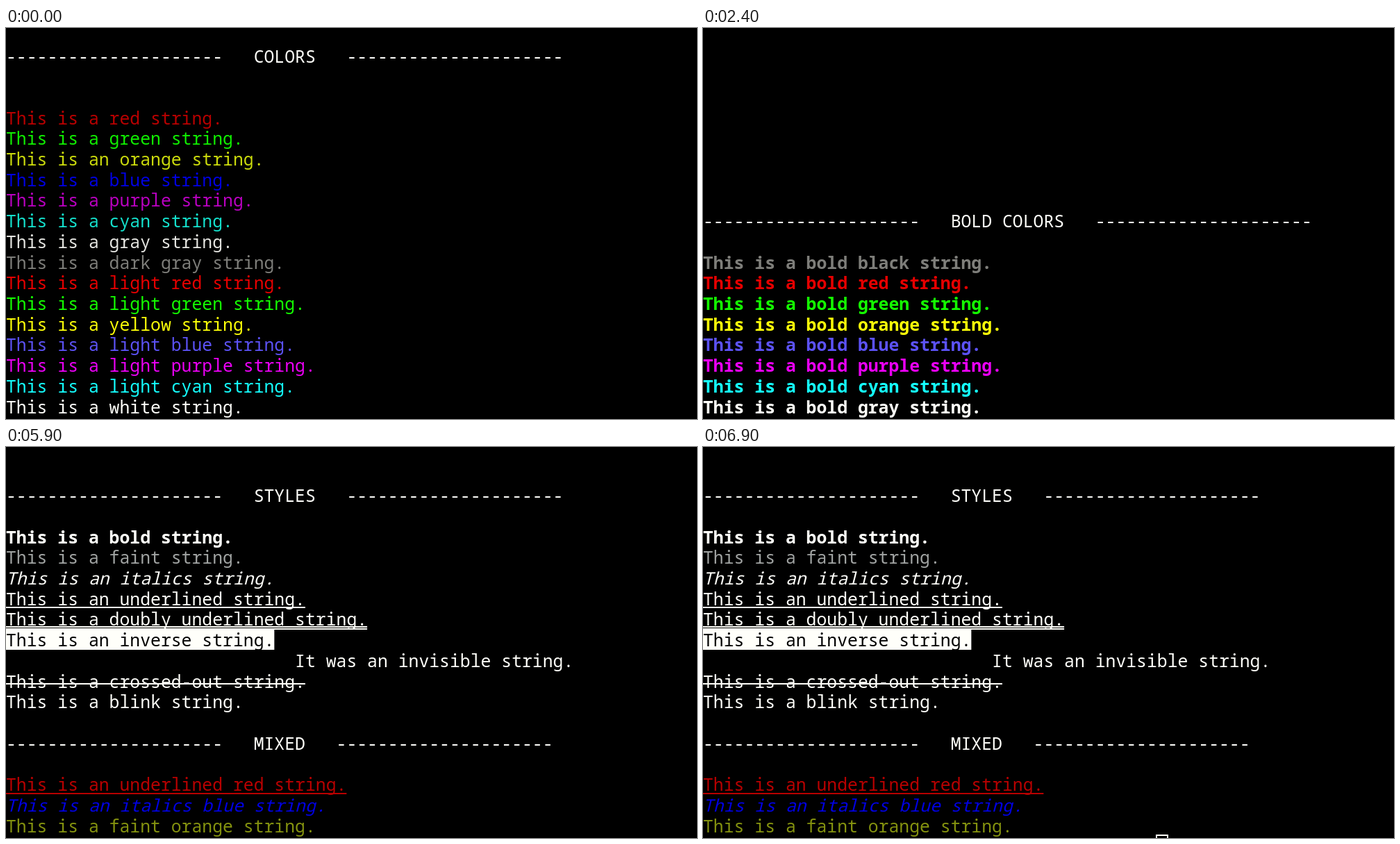
An HTML page with a canvas that plays this animation: 995 by 563 pixels, repeating every 7 s.

```html
<!DOCTYPE html>
<html lang="en">
<head>
<meta charset="utf-8">
<title>Terminal colors</title>
<style>
  html, body { margin: 0; width: 100%; height: 100%; overflow: hidden; background: #000; }
  canvas { display: block; }
</style>
</head>
<body>
<canvas id="term" width="995" height="563"></canvas>
<script>
const ctx = document.getElementById('term').getContext('2d');
const CELL = 14.86, ROW = 29.71, TOP = -4.8, LOOP = 7000;
const WHITE = '#fffffa';

const names = ['black', 'red', 'green', 'orange', 'blue', 'purple', 'cyan', 'gray',
  'dark gray', 'light red', 'light green', 'yellow', 'light blue', 'light purple', 'light cyan', 'white'];
const colors = ['#000000', '#b80000', '#10ee00', '#cada0c', '#0000e0', '#b900c0', '#14e0cc', '#e4e4e0',
  '#7e7e7a', '#e60000', '#14ff00', '#fcff08', '#5c52f6', '#ea00f4', '#14ffff', WHITE];

const rowTop = row => TOP + row * ROW;

function bar(row, from, to, width, color) {
  ctx.fillStyle = color;
  ctx.fillRect(0, Math.round(rowTop(row) + from), width, to - from);
}

// Each character sits on the terminal's cell grid.
function print(row, text, { color = WHITE, style = '', col = 0, back } = {}) {
  if (back) {
    const y = Math.round(rowTop(row));
    ctx.fillStyle = back;
    ctx.fillRect(0, y, text.length * CELL, Math.round(rowTop(row + 1)) - y);
  }
  ctx.font = `${style} 24.77px "Noto Sans Mono", "DejaVu Sans Mono", monospace`;
  ctx.fillStyle = color;
  [...text].forEach((ch, i) => ctx.fillText(ch, (col + i) * CELL, Math.round(rowTop(row) + 24.6)));
}

function line(row, text, offset, thickness, color = WHITE) {
  bar(row, offset, offset + thickness, text.length * CELL, color);
}

function title(row, text) {
  const dashes = '-'.repeat(21);
  print(row, `${dashes}   ${text}   ${dashes}`);
}

function plainColors() {
  title(1, 'COLORS');
  names.forEach((name, i) => {
    const article = name === 'orange' ? 'an' : 'a';
    print(3 + i, `This is ${article} ${name} string.`, { color: colors[i] });
  });
}

function boldColors() {
  title(9, 'BOLD COLORS');
  names.slice(0, 8).forEach((name, i) =>
    print(11 + i, `This is a bold ${name} string.`, { color: colors[i + 8], style: 'bold' }));
}

function backgrounds() {
  const swap = { blue: 'cyan', cyan: 'blue' };
  title(1, 'BACKGROUND COLORS');
  names.forEach((name, i) => {
    const back = colors[names.indexOf(swap[name] || name)];
    print(3 + i, `This is a background ${name} string.`, { back });
  });
  print(18, '<-(white)', { col: 35 });
}

function styles(t) {
  const under = 'This is an underlined string.';
  const double = 'This is a doubly underlined string.';
  const crossed = 'This is a crossed-out string.';
  const underRed = 'This is an underlined red string.';

  title(2, 'STYLES');
  print(4, 'This is a bold string.', { style: 'bold' });
  print(5, 'This is a faint string.', { color: '#a0a3a2' });
  print(6, 'This is an italics string.', { style: 'italic' });
  print(7, under);
  line(7, under, 27, 2);
  print(8, double);
  line(8, double, 25, 2);
  print(9, 'This is an inverse string.', { color: '#000', back: WHITE });
  line(8, double, 28, 2);
  print(10, 'It was an invisible string.', { col: 28 });
  print(11, crossed);
  line(11, crossed, 18, 2);
  const blinkOn = t >= 5600 && Math.floor((t - 5600) / 600) % 2 === 0;
  if (blinkOn) print(12, 'This is a blink string.');

  title(14, 'MIXED');
  print(16, underRed, { color: colors[1] });
  line(16, underRed, 27, 2, colors[1]);
  print(17, 'This is an italics blue string.', { color: colors[4], style: 'italic' });
  print(18, 'This is a faint orange string.', { color: '#84920f' });
  cursor(t);
}

function cursor(t) {
  if (t >= 6900) {
    ctx.strokeStyle = WHITE;
    ctx.lineWidth = 2;
    ctx.strokeRect(653, 559, 16, 30);
  } else if (t < 5900 || t >= 6500) {
    ctx.fillStyle = WHITE;
    ctx.fillRect(653.5, 560, 14.5, 30);
  }
}

function draw(now) {
  const t = now % LOOP;
  ctx.fillStyle = '#000';
  ctx.fillRect(0, 0, 995, 563);
  if (t < 1400) plainColors();
  else if (t < 3500) boldColors();
  else if (t < 5500) backgrounds();
  else styles(t);
}

const start = performance.now();
function tick() {
  draw(performance.now() - start);
  requestAnimationFrame(tick);
}
tick();
</script>
</body>
</html>
```
